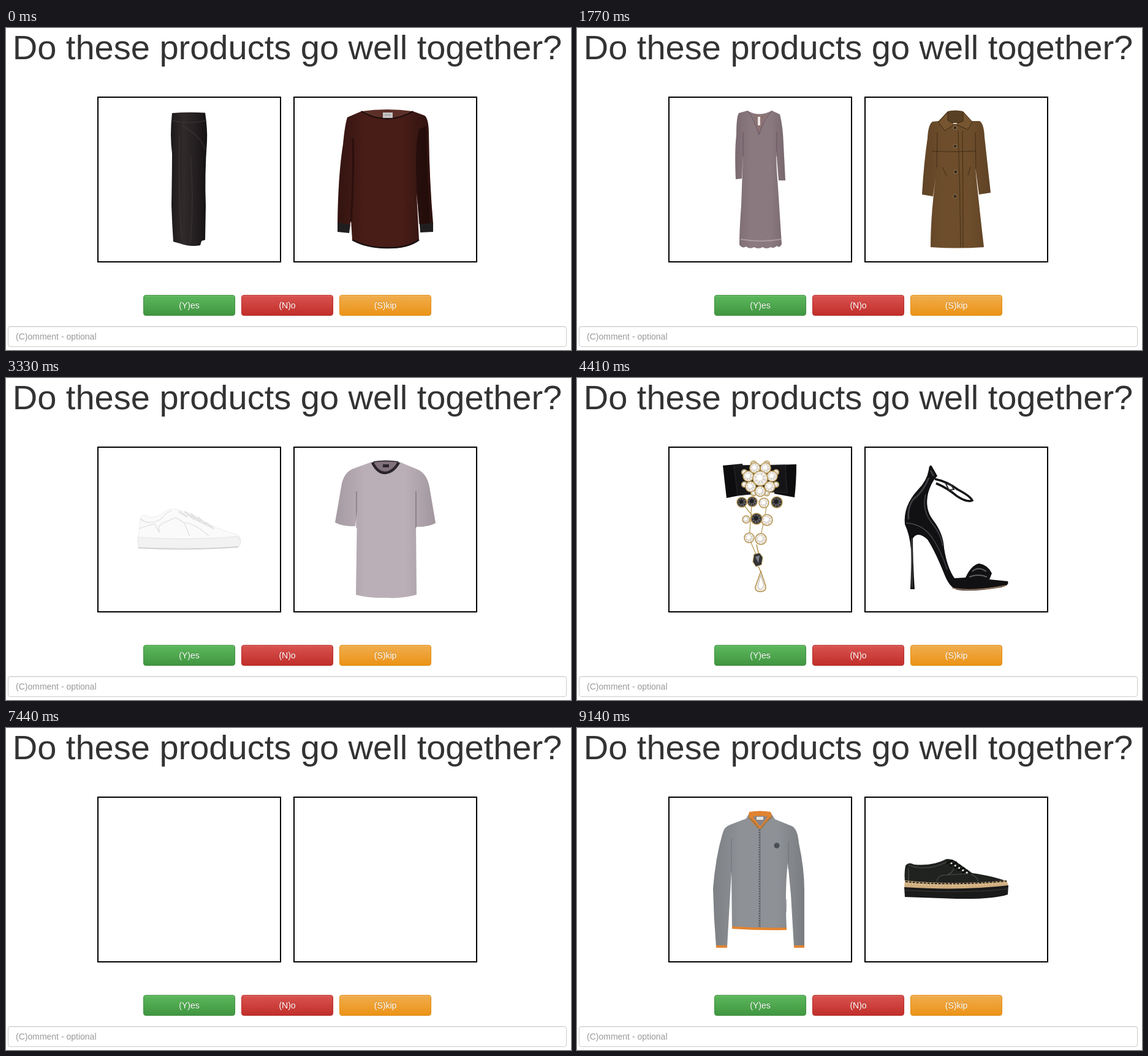
Recreate the animation shown at these times as an HTML page. Size 922x526 px, loop 9.61 s.

```html
<!DOCTYPE html>
<html lang="en">
<head>
<meta charset="utf-8">
<title>Product pairing</title>
<style>
html, body { margin: 0; width: 100%; height: 100%; overflow: hidden; background: #fff; }
body { position: relative; font: 14px/20px Arial, "Liberation Sans", sans-serif; }
h1, .frame, .btn, .field, svg { position: absolute; box-sizing: border-box; margin: 0; }
h1 { left: 0; top: 0; width: 918px; height: 64px; font-size: 56px; font-weight: 400; line-height: 64px; text-align: center; white-space: nowrap; color: #333; }
.frame { top: 112px; width: 300px; height: 271px; border: 2px solid #000; }
.btn { top: 436px; width: 150px; height: 34px; padding: 6px 0; border: 1px solid; border-radius: 4px; color: #fff; text-align: center; line-height: 20px; text-shadow: 0 -1px 0 rgba(0,0,0,.2); box-shadow: inset 0 1px 0 rgba(255,255,255,.15), 0 1px 1px rgba(0,0,0,.075); }
.yes { left: 224px; background: linear-gradient(#5cb85c, #419641); border-color: #3e8f3e; }
.no { left: 384px; background: linear-gradient(#d9534f, #c12e2a); border-color: #b92c28; }
.skip { left: 544px; background: linear-gradient(#f0ad4e, #eb9316); border-color: #e38d13; }
.field { left: 3px; top: 487px; width: 912px; height: 34px; padding: 6px 12px; border: 1px solid #ccc; border-radius: 4px; color: #999; box-shadow: inset 0 1px 1px rgba(0,0,0,.075); }
svg { left: 0; top: 0; }

.item { opacity: 0; animation: 9.61s step-end infinite; }
.velvet { animation-name: velvet; }
.preview { animation-name: preview; }
.dress { animation-name: dress; }
.coat { animation-name: coat; }
.sneaker { animation-name: sneaker; }
.tee { animation-name: tee; }
.evening { animation-name: evening; }
.mixed { animation-name: mixed; }
.casual { animation-name: casual; }
.knit { animation-name: knit; }
@keyframes velvet { 0% { opacity: 1 } 11.238%, to { opacity: 0 } }
@keyframes preview { 0% { opacity: 0 } 13.631% { opacity: 1 } 16.024%, to { opacity: 0 } }
@keyframes dress { 0% { opacity: 0 } 16.024% { opacity: 1 } 26.534%, to { opacity: 0 } }
@keyframes coat { 0% { opacity: 0 } 18.418% { opacity: 1 } 26.534%, to { opacity: 0 } }
@keyframes sneaker { 0% { opacity: 0 } 28.928% { opacity: 1 } 43.496%, to { opacity: 0 } }
@keyframes tee { 0% { opacity: 0 } 34.651% { opacity: 1 } 43.496%, to { opacity: 0 } }
@keyframes evening { 0% { opacity: 0 } 45.889% { opacity: 1 } 63.683%, to { opacity: 0 } }
@keyframes mixed { 0% { opacity: 0 } 66.076% { opacity: 1 } 77.419%, to { opacity: 0 } }
@keyframes casual { 0% { opacity: 0 } 79.812% { opacity: 1 } 92.715%, to { opacity: 0 } }
@keyframes knit { 0% { opacity: 0 } 95.109%, to { opacity: 1 } }
</style>
</head>
<body>
<h1>Do these products go well together?</h1>
<div class="frame" style="left:149px"></div>
<div class="frame" style="left:469px"></div>
<div class="btn yes">(Y)es</div>
<div class="btn no">(N)o</div>
<div class="btn skip">(S)kip</div>
<div class="field">(C)omment - optional</div>

<svg width="922" height="526" viewBox="0 0 922 526" fill="none">
<defs>
  <linearGradient id="shade">
    <stop offset="0" stop-opacity=".3"/><stop offset=".28" stop-opacity="0"/>
    <stop offset=".68" stop-opacity="0"/><stop offset="1" stop-opacity=".38"/>
  </linearGradient>
  <linearGradient id="soft">
    <stop offset="0" stop-opacity=".12"/><stop offset=".3" stop-opacity="0"/>
    <stop offset=".7" stop-opacity="0"/><stop offset="1" stop-opacity=".14"/>
  </linearGradient>
  <linearGradient id="satin">
    <stop offset="0" stop-color="#1d191a"/><stop offset=".35" stop-color="#302a2b"/>
    <stop offset=".7" stop-color="#231e1f"/><stop offset="1" stop-color="#151213"/>
  </linearGradient>
  <filter id="blur"><feGaussianBlur stdDeviation="1.5"/></filter>
  <g id="filters"></g>

  <path id="skirt-s" d="M271 139Q298 137 325 138.5Q329 165 328 185Q324 240 326 290L325 346L319 348L317 355Q300 358 284 352L273 349Q271 320 270 290Q271 230 271 205Q267 175 271 139Z"/>
  <path id="blouse-s" d="M580 136Q622 141 664 136L683 143Q690 148 690 175Q691 250 697 320L675 322L670 270L674 347Q655 361 620 360Q585 359 565 346L563 315L561 322L541 319Q542 240 550 190Q553 158 557 146Z"/>
  <path id="dress-s" d="M278 135Q297 146 318 135L331 141Q336 160 337 190L340 249L329 249L325 200Q325 225 328 260L334 353Q331 360 326 356Q321 361 316 358Q309 362 303 358Q296 362 289 358Q282 362 276 357Q270 361 265 354Q265 330 268 290L271 205L269 246L259 247Q257 200 260 175Q260 145 264 139Z"/>
  <path id="coat-s" d="M605 136Q616 134 630 136L643 152L657 152Q664 156 665 178L675 269L656 272L650 228Q655 280 664 358Q620 361 577 358Q577 300 588 225L581 275L563 272Q566 220 572 180Q573 158 580 153L590 152Z"/>
  <path id="tee-s" d="M597 137Q620 133 642 137L673 150Q687 157 691 178L701 237Q688 244 669 243L670 354Q645 361 620 359Q590 360 571 354L573 218L570 242Q550 243 537 236L548 172Q553 153 567 148Z"/>
  <path id="jacket-s" d="M279 141L281 136Q298 139 314 136L319 146L350 159Q359 163 361 178Q366 222 374 262Q374 300 371 329L353 328Q349 300 351 268L346 230L345 325Q325 334 300 335Q270 336 254 331L252 245L246 329L227 328Q224 295 222 262Q227 215 238 174Q241 160 251 157Z"/>
  <path id="pants-s" d="M583 136L650 135Q656 165 656 200L660 285L662 355Q652 361 641 357Q639 320 631 285Q625 230 621 194L616 194Q611 230 605 275Q599 320 600 355Q588 361 576 356Q577 290 578 235Q577 180 583 136Z"/>
  <path id="cardigan-s" d="M281 139Q299 146 316 138L323 149L350 160Q360 164 362 188Q371 230 371 265L371 357L354 357L349 272L344 220Q339 265 342 328Q298 329 253 326L252 235L245 357L227 357Q223 310 222 262Q226 212 237 174Q240 161 250 158L276 148Z"/>
</defs>

<g class="item velvet">
  <use href="#skirt-s" fill="url(#satin)"/>
  <path d="M271 151Q298 158 327 151M288 160Q318 176 326 200M301 210Q307 280 301 350M283 175Q281 270 287 344" stroke="#4a4243" stroke-width="2" opacity=".35"/>
  <use href="#blouse-s" fill="#481c17"/>
  <use href="#blouse-s" filter="url(#pile)"/>
  <use href="#blouse-s" filter="url(#sheen)"/>
  <use href="#blouse-s" fill="url(#shade)"/>
  <path d="M674 165Q667 190 670 260L674 320L692 320Q687 230 686 160Z" fill="#1a0908" opacity=".6"/>
  <path d="M566 180Q568 240 563 316" stroke="#230c0a" stroke-width="3" opacity=".7"/>
  <path d="M580 136Q622 130 664 136Q645 148 622 148Q598 148 580 136Z" fill="#5c3029"/>
  <path d="M580 136Q598 148 622 148Q645 148 664 136" stroke="#170b0b" stroke-width="2"/>
  <path d="M615 138h16v9h-16z" fill="#c4c2c4"/>
  <path d="M618 142h10" stroke="#85858a"/>
  <path d="M541 318L562 321L560 335L541 333ZM675 321L697 318L697 333L676 334Z" fill="#211e20"/>
  <path d="M565 346Q588 359 620 359Q655 360 674 346" stroke="#171112" stroke-width="2.5"/>
</g>

<g class="item preview"><use href="#dress" filter="url(#blur)"/></g>
<g class="item dress"><g id="dress">
  <use href="#dress-s" fill="#8b7980"/>
  <use href="#dress-s" filter="url(#cream)"/>
  <use href="#dress-s" filter="url(#rose)"/>
  <use href="#dress-s" filter="url(#indigo)"/>
  <use href="#dress-s" filter="url(#ink)"/>
  <use href="#dress-s" fill="url(#soft)"/>
  <path d="M287 140Q298 145 309 140L297 172Z" fill="#8d7273"/>
  <path d="M295 145h4v14h-4z" fill="#eee9e6"/>
  <path d="M278 135Q288 146 297 174Q304 151 318 135M271 170L271 210M326 170V210" stroke="#5f4c57" opacity=".8"/>
  <path d="M267 345Q300 351 333 345" stroke="#ded2ca" stroke-width="2" opacity=".4"/>
</g></g>

<g class="item coat"><g id="coat">
  <use href="#coat-s" fill="#6d4d2b"/>
  <use href="#coat-s" filter="url(#weave)"/>
  <use href="#coat-s" filter="url(#glint)"/>
  <use href="#coat-s" fill="url(#soft)"/>
  <path d="M606 136Q617 133 629 136L632 153Q616 158 603 152Z" fill="#584024"/>
  <path d="M605 137L590 154L600 168L617 157L638 166L645 153L630 137L630 152Q616 159 605 151Z" fill="#765530" stroke="#3b2815"/>
  <path d="M614 156h6" stroke="#ddd0bc" stroke-width="2"/>
  <path d="M579 201Q600 203 651 201M622 168Q625 260 626 358M629 168Q630 260 630 358M588 170L587 228M650 170L651 230M596 227L604 243M642 227L638 241" stroke="#392612" opacity=".8"/>
  <g fill="#3a2a1a" stroke="#a18b69" stroke-width=".8">
    <circle cx="617" cy="163" r="3"/><circle cx="617" cy="193" r="3"/><circle cx="618" cy="235" r="3.2"/><circle cx="617" cy="275" r="3.2"/>
  </g>
</g></g>

<g class="item sneaker">
  <path d="M216 262L219 231Q222 221 229 225Q240 233 262 217Q272 211 285 217Q305 220 331 240Q355 249 379 257Q384 262 383 268L215 268Z" fill="#fafafa" stroke="#ececec"/>
  <path d="M219 229Q230 242 252 231Q262 219 270 217M251 253Q246 242 256 237L277 228L291 237L300 258M292 236Q310 239 331 258M300 227L340 247M217 246L242 238L251 253" stroke="#dedede" stroke-width="1.2"/>
  <path d="M282 218l14 9M291 218l17 13M302 222l15 13M313 227l14 13M325 236l13 8" stroke="#e3e3e3" stroke-width="3"/>
  <path d="M215 260Q290 266 379 259Q386 269 380 275Q350 279 300 278L216 277Z" fill="#f2f2f2" stroke="#e4e4e4"/>
  <path d="M216 277.5Q300 282 379 276" stroke="#c8c8c8" stroke-width="1.6"/>
</g>

<g class="item tee">
  <use href="#tee-s" fill="#bbafb7"/>
  <use href="#tee-s" filter="url(#plum)"/>
  <use href="#tee-s" filter="url(#crack)"/>
  <use href="#tee-s" filter="url(#craze)"/>
  <use href="#tee-s" fill="url(#soft)"/>
  <path d="M600 138Q620 133 639 138Q630 153 619 154Q607 152 600 138Z" fill="#81717c"/>
  <path d="M598 138Q606 155 619 155Q632 154 641 138" stroke="#2b252b" stroke-width="4.5"/>
  <path d="M600 137Q620 134 640 137" stroke="#3d343c" stroke-width="2"/>
  <path d="M615 141h10v5h-10z" fill="#2c262c"/>
  <path d="M572 185L572 245M669 185V245" stroke="#40303a" opacity=".6"/>
</g>

<g class="item evening">
  <path d="M238 143L270 140L275 190L244 196Q241 170 238 143ZM322 142L358 141Q358 170 355 195L322 189Z" fill="#0d0d0f"/>
  <path d="M256 143L340 142L343 188L322 186L262 192Z" fill="#151517" stroke="#29292c"/>
  <g id="stones"></g>
  <path d="M293 272L296 286M296 308L300 317M300 316L291 341Q290 349 299 349Q309 349 308 340Z" stroke="#b08d45" stroke-width="1.4" fill="#f0ebe2"/>
  <path d="M300 322L295 340L299 346L305 339Z" fill="#fff" stroke="#aaa59c" stroke-width=".8"/>
  <path d="M289 288L298 286L303 293L301 305L292 308L287 300Z" fill="#33343a" stroke="#b08d45"/>
  <path d="M291 292L298 290L296 302Z" fill="#81848a"/>

  <path d="M574 150Q575 140 579 144L588 160Q578 170 573 188Q567 214 581 232Q598 254 599 278Q604 310 616 327L634 326Q643 306 656 303Q670 305 677 319L673 329L703 332Q706 339 692 342Q645 350 620 346Q608 342 600 322Q584 282 572 264Q556 249 548 262Q548 300 551 345L544 345Q546 300 545 280Q543 256 535 239Q532 209 556 183Q571 168 574 150Z" fill="#111113"/>
  <path d="M574 163Q566 185 548 199Q539 212 541 231M577 151L582 160" stroke="#606067" stroke-width="3" opacity=".55"/>
  <path d="M537 237Q563 238 579 260Q594 282 604 313" stroke="#4a4a4f" stroke-width="1.3"/>
  <path d="M569 190Q562 216 580 238Q594 255 597 274" stroke="#3c3c41" stroke-width="2"/>
  <path d="M546 262L547 342" stroke="#55555b" stroke-width="1.2"/>
  <path d="M584 165Q604 169 621 182Q642 193 645 200Q637 204 620 193Q605 180 586 172" stroke="#151517" stroke-width="3.6"/>
  <path d="M602 173l8 1l5 8l-8 1z" stroke="#303035" stroke-width="2"/>
  <path d="M645 316Q655 307 668 316M640 325Q655 319 669 325" stroke="#8a8a90" stroke-width="2" opacity=".65"/>
  <path d="M612 343Q645 350 700 339" stroke="#a78363" stroke-width="1.6"/>
</g>

<g class="item mixed">
  <use href="#derby" x="-319"/>
  <use href="#coat" transform="translate(-61.9 0) scale(1.1 1)"/>
</g>

<g class="item casual">
  <use href="#jacket-s" fill="#1c2122"/>
  <use href="#jacket-s" filter="url(#camo)"/>
  <use href="#jacket-s" filter="url(#fleck)"/>
  <use href="#jacket-s" fill="url(#soft)"/>
  <path d="M281 137Q298 142 314 137L317 147L299 158L280 148Z" fill="#202627" stroke="#0c0f10"/>
  <path d="M290 148Q298 151 306 148L297 155Z" fill="#b9b3a8"/>
  <path d="M296 157Q298 240 295 334M302 176L343 180L343 192L302 190ZM252 175Q255 220 252 260M346 180L347 240" stroke="#0c1011" stroke-width="1.2"/>
  <g id="snaps" fill="#b9bdbb"></g>
  <path d="M278 333Q283 342 282 350M315 335Q310 340 313 346" stroke="#deded8" stroke-width="2"/>
  <path d="M282 350L283 359M313 345L311 352" stroke="#8a7e58" stroke-width="3"/>
  <path d="M227 317L246 318M353 317L372 318" stroke="#0b0e0f"/>

  <use href="#pants-s" fill="#f0d72d"/>
  <use href="#pants-s" fill="url(#soft)"/>
  <path d="M582 147Q615 151 653 147M617 140Q621 170 619 193M583 153L578 171M645 150Q648 163 655 168M619 194Q604 188 595 192M620 194Q634 185 647 189M590 210Q588 285 588 353M644 205Q648 280 652 354" stroke="#bea215" opacity=".65"/>
  <path d="M606 290Q596 280 584 284M632 285Q644 276 654 281M577 349Q588 354 600 349M640 350Q650 354 662 349" stroke="#caae1c" opacity=".6"/>
  <circle cx="603" cy="140" r="1.5" fill="#695c22"/><circle cx="618" cy="142" r="2" fill="#45401f"/>
  <path d="M640 137.5L648 139" stroke="#23201a" stroke-width="3"/>
</g>

<g class="item knit">
  <use href="#cardigan-s" fill="#8e9196"/>
  <use href="#cardigan-s" filter="url(#marl)"/>
  <use href="#cardigan-s" filter="url(#frost)"/>
  <use href="#cardigan-s" fill="url(#soft)"/>
  <path d="M281 137Q299 134 316 137L318 145Q307 157 300 165L297 165Q285 155 280 146Z" fill="#e08231"/>
  <path d="M287 145Q299 142 311 145L299 161Z" fill="#858489"/>
  <path d="M293 145h11v5h-11z" fill="#e5e4e1"/>
  <path d="M280 146Q290 154 297 165M318 145Q307 154 300 165" stroke="#987546" stroke-width="2"/>
  <path d="M298 164V328" stroke="#565a60" stroke-width="2.5"/>
  <path d="M298 164V328" stroke="#b6b8bb" stroke-dasharray="2 2"/>
  <path d="M253 326Q298 329 342 328M227 357L245 357M354 357L371 357" stroke="#e38430" stroke-width="4"/>
  <path d="M252 180L252 235M345 185L345 230M342 280L341 301" stroke="#606368" opacity=".6"/>
  <circle cx="326" cy="192" r="4.5" fill="#4a4e55"/>

  <g id="derby">
    <path d="M536 225Q541 218 550 223Q580 226 603 214Q613 213 621 220L645 237Q680 242 700 250L703 258L536 258Q533 240 536 225Z" fill="#20221f"/>
    <path d="M541 224Q570 235 603 219M587 251Q588 240 603 240L638 238M616 227Q613 238 603 240M643 239Q655 244 654 251M541 229V250" stroke="#4b4e48" stroke-width="1.2"/>
    <path d="M535 249Q610 257 701 249L704 258Q640 266 534 261Z" fill="#d0ae7f"/>
    <path d="M536 251Q610 258 701 250" stroke="#2b2822" stroke-width="2" stroke-dasharray="4 2"/>
    <path d="M537 254Q610 261 702 253" stroke="#f1dfc1" stroke-dasharray="2 3"/>
    <path d="M534 260Q630 266 704 257L703 272Q680 280 620 279L535 276Z" fill="#1a1a1a"/>
    <path d="M535 265Q630 271 703 263" stroke="#393937"/>
    <path d="M603 221l10-5M608 225l12-6M615 229l11-5M621 233l11-5M628 237l10-4" stroke="#0d0f0d" stroke-width="3"/>
    <g id="eyelets" fill="#dfe1dc"></g>
  </g>
</g>
</svg>

<script>
const $ = id => document.getElementById(id);

// name: [noise, frequency, octaves, seed, colour, alpha slope, alpha offset]
const textures = {
  pile: ['fractalNoise', '.09 .04', 4, 4, '#220a08', 5, -2.3],
  sheen: ['fractalNoise', '.03 .025', 5, 12, '#a55b49', 4, -2.2],
  cream: ['fractalNoise', '.16', 2, 3, '#cfc4bf', 8, -4.3],
  rose: ['fractalNoise', '.14', 2, 8, '#a76d76', 9, -5],
  indigo: ['fractalNoise', '.15', 2, 17, '#40507f', 10, -5.4],
  ink: ['fractalNoise', '.18', 2, 29, '#373447', 10, -5.7],
  weave: ['turbulence', '.16', 1, 5, '#3c270f', -4, .9],
  glint: ['fractalNoise', '.2', 2, 6, '#a17f52', 5, -2.8],
  plum: ['fractalNoise', '.03', 3, 14, '#7c3d59', 5, -2.3],
  crack: ['turbulence', '.11', 1, 21, '#39212e', -9, 1.3],
  craze: ['turbulence', '.14', 1, 33, '#4b2c3b', -8, 1],
  camo: ['fractalNoise', '.028', 3, 9, '#424a4b', 16, -8.3],
  fleck: ['fractalNoise', '.12', 2, 2, '#0c1011', 6, -3.2],
  marl: ['fractalNoise', '.5', 2, 7, '#555960', 5, -2.5],
  frost: ['fractalNoise', '.45', 2, 19, '#c8cacd', 5, -2.6]
};
$('filters').innerHTML = Object.entries(textures).map(([id, [type, freq, oct, seed, hex, slope, off]]) => {
  const rgb = [1, 3, 5].map(i => '0 0 0 0 ' + parseInt(hex.slice(i, i + 2), 16) / 255).join(' ');
  return `<filter id="${id}" color-interpolation-filters="sRGB">
    <feTurbulence type="${type}" baseFrequency="${freq}" numOctaves="${oct}" seed="${seed}"/>
    <feColorMatrix values="${rgb} 0 0 0 ${slope} ${off}"/>
    <feComposite operator="in" in2="SourceGraphic"/></filter>`;
}).join('');

const dot = (x, y, r) => `<circle cx="${x}" cy="${y}" r="${r}"/>`;

// A faceted crystal in a gold setting.
function stone(x, y, r, dark) {
  let facets = '';
  for (let i = 0; i < 8; i++) {
    const a = i * Math.PI / 4 + .3;
    facets += `M${x} ${y}L${x + r * .8 * Math.cos(a)} ${y + r * .8 * Math.sin(a)}`;
  }
  return `<circle cx="${x}" cy="${y}" r="${r}" fill="${dark ? '#3b3a3d' : '#eee9e2'}" stroke="#b69550" stroke-width="1.5"/>
    <path d="${facets}" stroke="${dark ? '#a6a4a3' : '#b5aca2'}" stroke-width=".8"/>
    <circle cx="${x - r * .1}" cy="${y - r * .1}" r="${r * .42}" fill="${dark ? '#202024' : '#fff'}"/>`;
}

let gems = '<path d="M285 208L281 262L293 290M310 207L299 263M270 205L292 232" stroke="#b69550" stroke-width="1.2"/>';
for (let i = 0; i < 8; i++) {
  const a = (i + .5) * Math.PI / 4;
  gems += stone(299 + 28 * Math.cos(a), 164 + 26 * Math.sin(a), 4.5);
}
for (let i = 0; i < 7; i++) {
  const a = Math.PI / 2 + i * Math.PI * 2 / 7;
  gems += stone(299 + 20 * Math.cos(a), 165 + 20 * Math.sin(a), 8.5);
}
gems += stone(299, 164, 12);
const pendants = [[269, 203, 8, 1], [286, 202, 8, 1], [305, 204, 8, 0], [326, 203, 9, 1], [276, 231, 6, 0],
  [310, 232, 9, 0], [293, 230, 9, 1], [281, 261, 8, 0], [300, 263, 9, 0]];
$('stones').innerHTML = gems + pendants.map(p => stone(...p)).join('');

let snaps = '', eyelets = '';
for (let i = 0; i < 5; i++) {
  snaps += dot(296.5, 168 + i * 26, 1.6);
  eyelets += dot(611 + i * 6.3, 221 + i * 3.8, 1.6);
}
$('snaps').innerHTML = snaps;
$('eyelets').innerHTML = eyelets;
</script>
</body>
</html>
```
